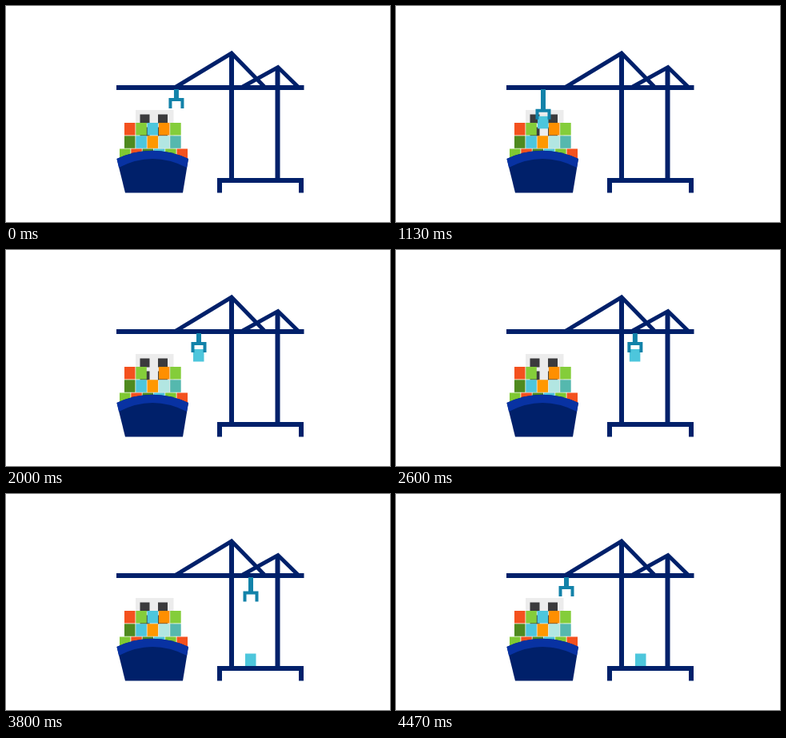
An HTML page that plays this animation: 480x270 px, repeating every 4.54 s.

```html
<!DOCTYPE html>
<html lang="en">
<head>
<meta charset="utf-8">
<title>Harbour crane</title>
<style>
  html, body { margin: 0; width: 100%; height: 100%; overflow: hidden; background: #fff; }
  svg { display: block; width: 100vw; height: 100vh; }
</style>
</head>
<body>
<svg viewBox="0 0 480 270">
  <path fill="#ececec" d="M162 130h47.500v55h-47.500z"/>
  <path fill="#3b3b3d" d="M167.500 135.500h12v11h-12z M190 135.500h12v11h-12z M167.500 151.500h12v11h-12z M190 151.500h12v11h-12z"/>
  <g id="cargo"></g>
  <path fill="#00206a" d="M138.500 191Q183 170.500 228 191L221 233.500H149Z"/>
  <path fill="#0832a2" d="M138.500 191Q183 170.500 228 191L226 202Q183 180 141 202Z"/>
  <g fill="none" stroke="#00206a" stroke-width="6">
    <path d="M138 102H372.500 M282 60V216 M339.500 78V216 M267 233.500V218H369V233.500"/>
    <path stroke-width="5" d="M211 102L282 59L324 102 M294 102L340 76.500L366 102"/>
  </g>
  <rect id="load" width="13.500" height="15.500" fill="#4dc6dc"/>
  <path id="claw" fill="none" stroke="#1282a9" stroke-width="4"/>
</svg>
<script>
const LOOP = 4540, GRAB = 985, RELEASE = 3190;
const SHIP_X = 184, QUAY_X = 306;
const get = id => document.getElementById(id);
const cargo = get('cargo'), load = get('load'), claw = get('claw');

function addRow(x, y, colors) {
  return colors.map((fill, i) => {
    const box = document.createElementNS('http://www.w3.org/2000/svg', 'rect');
    const attrs = { x: x + i * 14.3, y, width: 13.5, height: 15.5, fill };
    for (const name in attrs) box.setAttribute(name, attrs[name]);
    return cargo.appendChild(box);
  });
}
addRow(142, 178.5, ['#7fc832', '#f4511e', '#4f8a1e', '#4dc6dc', '#7fc832', '#f4511e']);
addRow(148, 162.3, ['#4f8a1e', '#4dc6dc', '#ff9800', '#b2e6e2', '#55b8ae']);
const topRow = addRow(148, 146, ['#f4511e', '#84cd3a', '#4dc6dc', '#ff8f00', '#84cd3a']);

// Pairs of [time, value], linear in between
const trolleyX = [[0, 213], [480, SHIP_X], [1410, SHIP_X], [2675, QUAY_X], [3860, QUAY_X], [4470, 213], [LOOP, 213]];
const dropY = [[0, 0], [480, 0], [GRAB, 21], [1410, 0], [2675, 0], [RELEASE, 74], [3860, 0], [LOOP, 0]];

function valueAt(keys, t) {
  const i = keys.findIndex(key => key[0] > t);
  const [t0, a] = keys[i - 1], [t1, b] = keys[i];
  return a + (b - a) * (t - t0) / (t1 - t0);
}

function draw(now) {
  const t = now % LOOP;
  const x = valueAt(trolleyX, t), y = 115 + valueAt(dropY, t);
  claw.setAttribute('d', `M${x - 7.5} ${y + 13}V${y + 2}H${x + 7.5}V${y + 13} M${x - 1} 104V${y + 2} M${x + 1} 104V${y + 2}`);

  const released = t >= RELEASE;
  load.setAttribute('x', (released ? QUAY_X : x) - 7);
  load.setAttribute('y', released ? 199.5 : y + 9);
  load.style.display = t < GRAB ? 'none' : '';
  topRow[2].style.display = t < GRAB || released ? '' : 'none';
  requestAnimationFrame(draw);
}
draw(performance.now());
</script>
</body>
</html>
```
